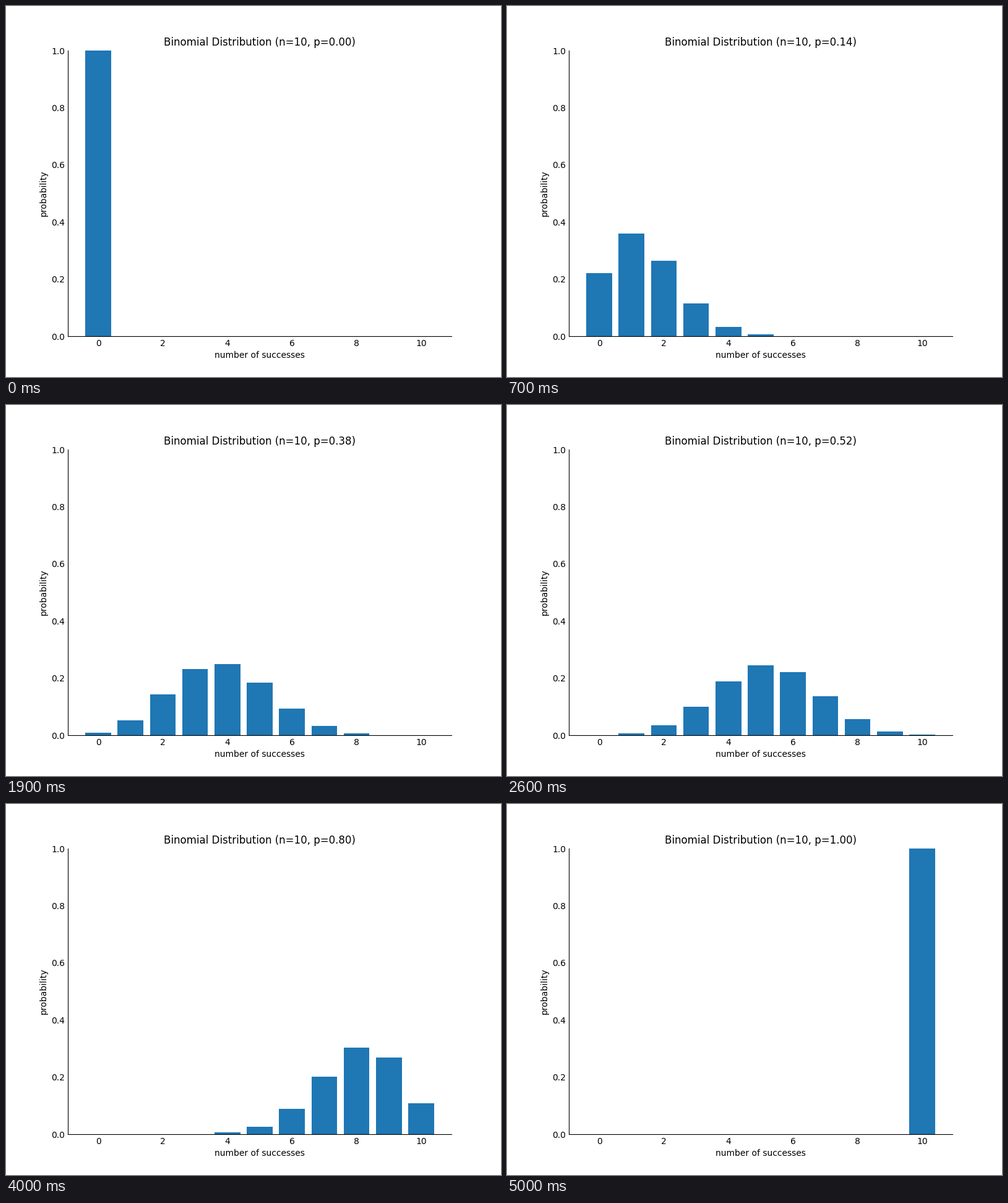
These frames come from a looping animation (800 px wide and 600 px high, 5100 ms). A matplotlib script:

```python
import math

import matplotlib.pyplot as plt
import numpy as np
from matplotlib.animation import FuncAnimation

N = 10
FRAMES = 51
INTERVAL = 100

plt.rcParams["font.family"] = "DejaVu Sans"


def binomial(p):
    return [math.comb(N, k) * p**k * (1 - p) ** (N - k) for k in range(N + 1)]


def title_text(p):
    return f"Binomial Distribution (n={N}, p={p:.2f})"


fig, ax = plt.subplots(figsize=(8, 6), dpi=100)
bars = ax.bar(np.arange(N + 1), binomial(0.0), color="#1f77b4")
title = ax.set_title(title_text(0.0))
ax.set_xlabel("number of successes")
ax.set_ylabel("probability")
ax.set_ylim(0, 1)
ax.spines[["top", "right"]].set_visible(False)
ax.tick_params(length=0)


def update(frame):
    p = frame / (FRAMES - 1)
    for bar, height in zip(bars, binomial(p)):
        bar.set_height(height)
    title.set_text(title_text(p))
    return [*bars, title]


anim = FuncAnimation(fig, update, frames=FRAMES, interval=INTERVAL,
                     repeat=True, repeat_delay=0)
plt.show()
```
